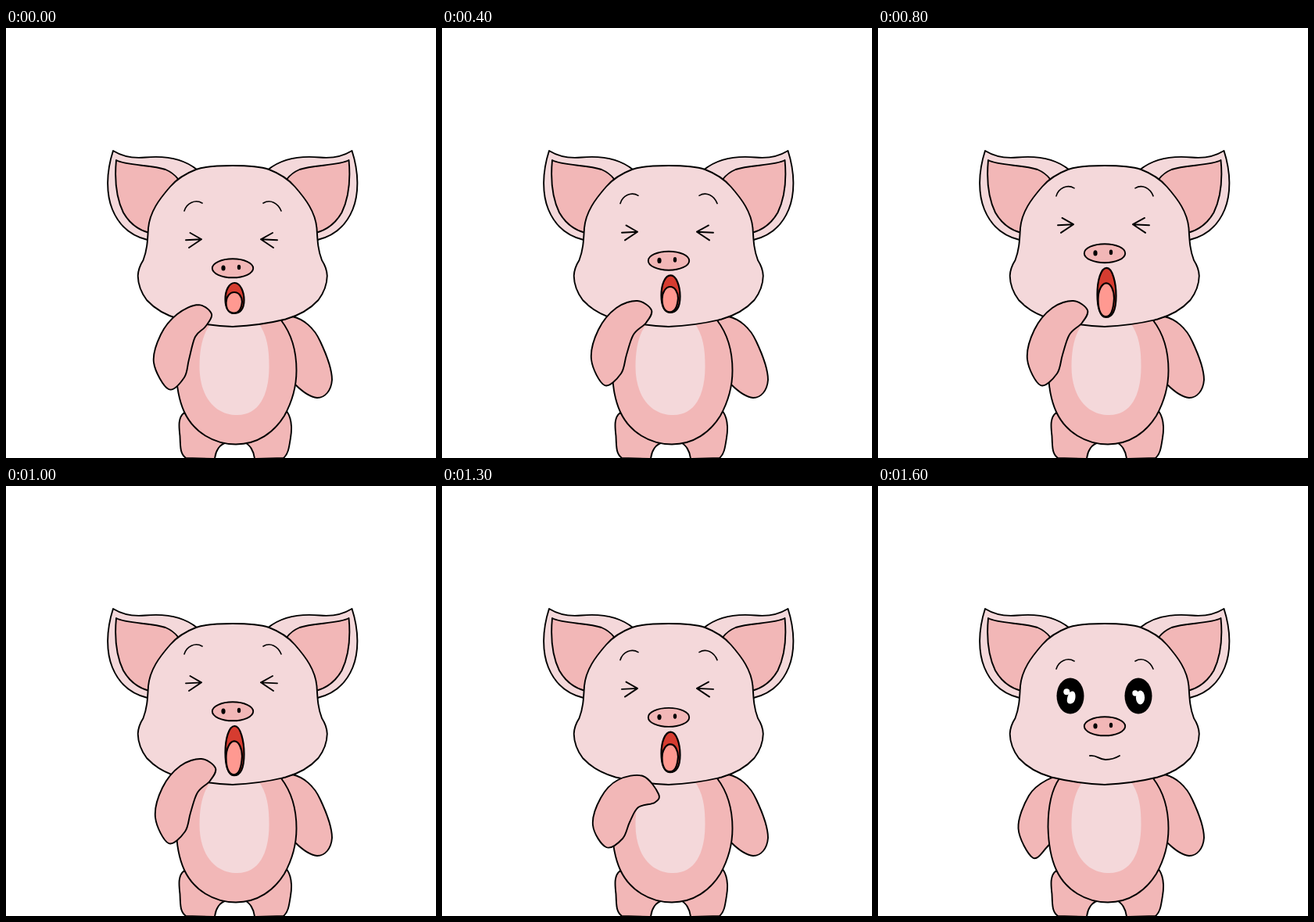
Recreate the animation shown at these times as an HTML page. Size 550 by 550 pixels, loop 2.2 s.

```html
<!DOCTYPE html>
<html lang="en">
<head>
<meta charset="utf-8">
<title>Yawning pig</title>
<style>
  html, body { margin: 0; width: 100%; height: 100%; overflow: hidden; background: #fff; }
  svg { display: block; width: 100%; height: 100%; }
  .line { stroke: #000; stroke-width: 1.9; stroke-linecap: round; stroke-linejoin: round; }
  .thin { stroke-width: 1.6; }
  .light { fill: #f4d8da; }
  .rose { fill: #f2b7b7; }
  .none { fill: none; }
  #mouth path { stroke-width: 2.2; vector-effect: non-scaling-stroke; }
</style>
</head>
<body>
<svg viewBox="0 0 550 550">
  <defs>
    <g id="ear" class="line">
      <path class="light" d="M137 157C150 165 163 167 178 165.500C205 163 228 168 244 181L181 271C160 266 145 254 136 232C128 212 128 185 137 157Z"/>
      <path class="rose" d="M141 169C153 176 187 175 204 181C211 184 216 188 220 193L183 262C168 258 158 250 150 236C140 215 139 190 141 169Z"/>
    </g>
    <path id="half" d="M290 176C272 176 256 176.500 243 181C230 186 220 191.500 210 203C196 219 184 235 182 256C181 273 180.500 284 175.500 297C171 304 169 310 168.700 317C169 331 174 340 180 348C191 360 206 368 222 372.500C244 378 268 381 290 382"/>
  </defs>

  <g class="line rose">
    <path d="M228 492C220 498 221 509 222.500 522C223 537 223 545 230 550L267 551C268 541 273 532 283 530Z"/>
    <path d="M359 490C366 500 366 512 364 524C362 537 361 545 355 550L318 551C317 541 312 533 305 530Z"/>
    <path d="M366 369C380 372 394 383 402 401C410 418 417 435 417 450C416 464 408 473 398 473C388 472 378 464 370 456L352 374Z"/>
    <path id="armBack"/>
    <path d="M232 374C221 390 217.500 412 217.500 436C218 460 222 478 228 491C240 517 266 532.500 294 532.500C322 532.500 343 517 356 496C366 478 371.500 458 371.500 438C371.500 412 365 391 352 374Z"/>
  </g>
  <path class="light" d="M262 378C251 392 247.500 412 247.500 433C247.500 470 266 495 296 495C323 495 336.500 470 336.500 433C336.500 410 334 392 322 376Z"/>

  <use href="#ear"/>
  <use href="#ear" transform="matrix(-1 0 0 1 579.5 0)"/>
  <g class="line light">
    <use href="#half"/>
    <use href="#half" transform="matrix(-1 0 0 1 579.5 0)"/>
  </g>
  <path class="light" d="M288 177.500h4v203h-4z"/>

  <g id="face" class="line">
    <path class="none thin" d="M228 234C231 224 242 218.500 251 224M329 224C338 218.500 348 224 352 234"/>
    <path id="squint" class="none" d="M230 271.300L250 270.300L235.500 262M250 270.300L234 281M347 271.300L326 270.300L341 262M326 270.300L342 281"/>
    <ellipse class="rose" cx="290" cy="307.300" rx="26.200" ry="12"/>
    <g stroke="none">
      <ellipse cx="278" cy="307" rx="2.600" ry="3.600"/>
      <ellipse cx="298" cy="306" rx="2.200" ry="3.300"/>
    </g>
  </g>

  <g id="mouth" class="line">
    <path fill="#d63c30" d="M292.500 326C300 326 304.500 338 304.500 348C304.500 360 299 365 291.500 365C284 365 280.500 357 280.500 347C280.500 336 285 326 292.500 326Z"/>
    <path fill="#ff9991" d="M292 338C298 338 302 344 302 350C301 360 297 364.500 291.500 364.500C285 364.500 281.500 359 281.500 351C281.500 344 286 338 292 338Z"/>
  </g>

  <g id="calm">
    <ellipse cx="246" cy="268.500" rx="17.500" ry="23"/>
    <ellipse cx="333" cy="268.500" rx="17.500" ry="23"/>
    <g fill="#fff">
      <circle cx="241.300" cy="263.300" r="4"/>
      <path d="M245 264C250 260 253 264 252.500 270C252 277 248 279 245 278.500C240 278 242 271 243 268Z"/>
      <circle cx="329" cy="265" r="3.700"/>
      <ellipse cx="335.500" cy="270.500" rx="5.600" ry="9"/>
    </g>
    <path class="line none" d="M271 345C281 344 282 350 291 350C300 350 304 348 309 345"/>
  </g>

  <path id="armFront" class="line rose"/>
</svg>
<script>
const $ = id => document.getElementById(id);
const STEP = 100, LOOP = 2200, LAST = 16;

// Arm outlines: back of hand, elbow, then round to the fingertip
const start   = [246,354, 219,366, 198,392, 189,428, 208,462, 228,447, 234,424, 242,395, 255,382, 263,366];
const raised  = [250,349, 223,358, 200,386, 191,424, 208,457, 229,442, 236,418, 245,392, 261,377, 268,361];
const sinking = [250,357, 223,364, 201,388, 191,426, 208,459, 228,448, 236,424, 243,399, 260,389, 269,374];
const lowered = [257,371, 225,376, 203,399, 193,434, 210,462, 231,451, 240,430, 251,411, 272,405, 277,394];
const resting = [238,372, 216,376, 193,396, 179.5,438, 198,475.5, 216,462, 228,445, 236,420, 242,400, 244,385];

const mix = (a, b, u) => a.map((v, i) => v + (b[i] - v) * u);

// Linear blend between [step, values] keys
function track(keys, n) {
  let i = 0;
  while (i < keys.length - 2 && n > keys[i + 1][0]) i++;
  const [n0, a] = keys[i], [n1, b] = keys[i + 1];
  return mix(a, b, (n - n0) / (n1 - n0));
}

// Each value pair: face lift, mouth height
const yawn = [[0, [0, 39]], [2, [-3.5, 39.5]], [4, [-9.6, 47.5]], [9, [-21.5, 67]], [13, [-11.4, 51.5]], [15, [-6, 43]]];
const reach = [[0, start], [2, raised], [10, raised], [11, sinking], [13, lowered]];

// Closed Catmull-Rom curve
function smooth(p) {
  const n = p.length / 2;
  const at = i => { const k = (i + n) % n * 2; return [p[k], p[k + 1]]; };
  let d = "M" + at(0);
  for (let i = 0; i < n; i++) {
    const [a, b, c, e] = [at(i - 1), at(i), at(i + 1), at(i + 2)];
    const out = b.map((v, k) => v + (c[k] - a[k]) / 6);
    const into = c.map((v, k) => v - (e[k] - b[k]) / 6);
    d += `C${out} ${into} ${c}`;
  }
  return d + "Z";
}

const show = (id, on) => { $(id).style.display = on ? "" : "none"; };

function draw(n) {
  const calm = n === LAST, back = n >= LAST - 1;
  const [lift, height] = calm ? [0, 39] : track(yawn, n);
  $("face").setAttribute("transform", `translate(0 ${lift})`);
  $("mouth").setAttribute("transform", `translate(0 ${326 + lift}) scale(1 ${height / 39}) translate(0 -326)`);
  show("squint", !calm);
  show("mouth", !calm);
  show("calm", calm);
  show("armBack", back);
  show("armFront", !back);
  if (back) {
    $("armBack").setAttribute("d", smooth(resting));
    $("armBack").setAttribute("transform", `rotate(${calm ? 0 : 6} 238 372)`);
  } else {
    $("armFront").setAttribute("d", smooth(track(reach, n)));
  }
}

const begin = performance.now();
let shown = -1;
function tick() {
  const t = (performance.now() - begin) % LOOP;
  const n = Math.min(LAST, Math.floor(t / STEP));
  if (n !== shown) draw(shown = n);
  requestAnimationFrame(tick);
}
tick();
</script>
</body>
</html>
```
